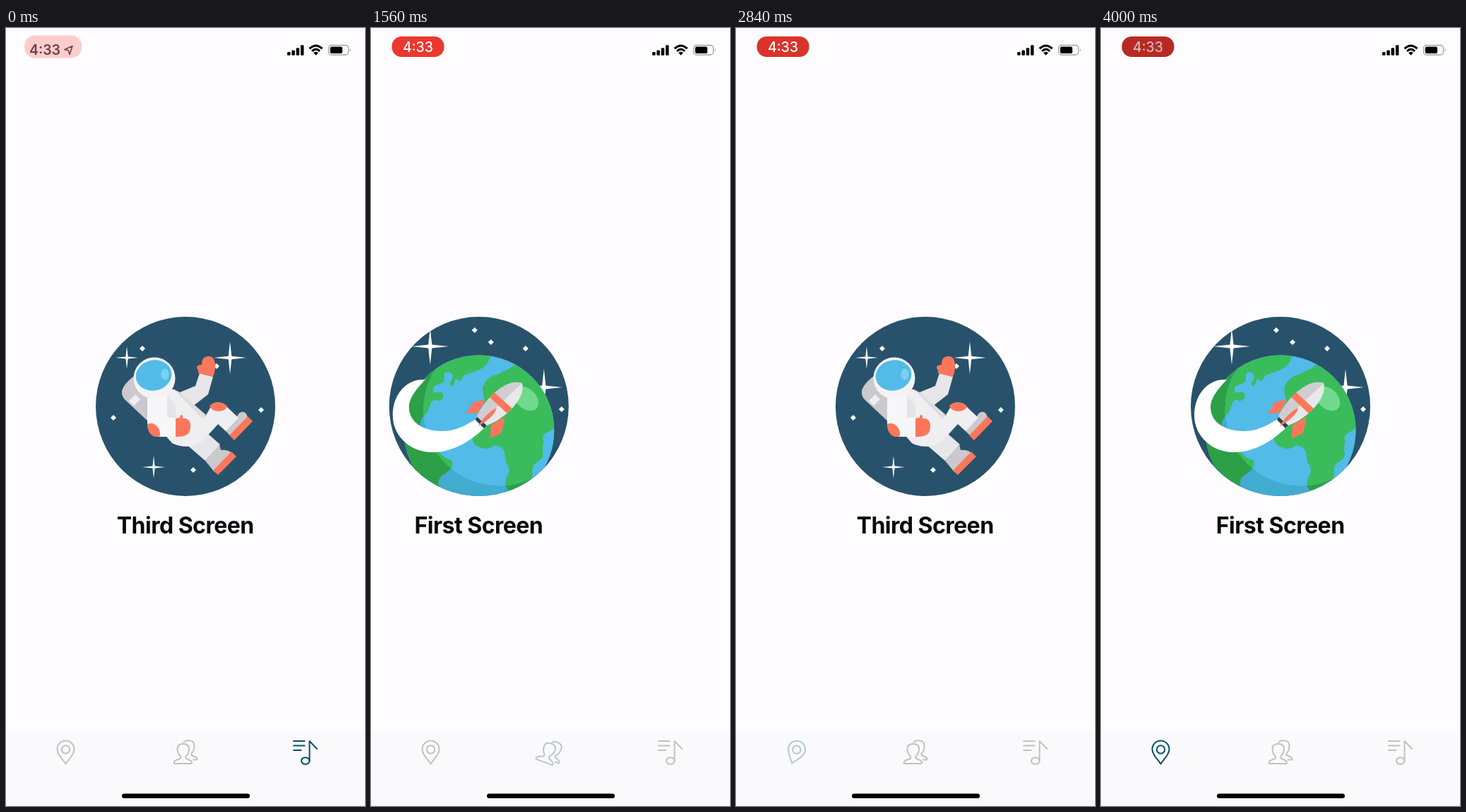
Write an HTML page that moves like this. It is 508 by 1102 pixels and loops after 4040 ms.

```html
<!DOCTYPE html>
<html lang="en">
<head>
<meta charset="utf-8">
<title>Tab bar transitions</title>
<style>
html, body { margin: 0; width: 100%; height: 100%; overflow: hidden; background: #fefcff; }
svg { display: block; width: 100%; height: 100%; }
text { font-family: Inter, Roboto, sans-serif; }
.title { font-size: 32px; font-weight: 700; letter-spacing: -.5px; text-anchor: middle; fill: #08080a; }
.icon { fill: none; stroke-width: 2; stroke-linecap: round; stroke-linejoin: round; }
.land { fill: currentColor; }
</style>
</head>
<body>
<svg viewBox="0 0 508 1102" preserveAspectRatio="none">
  <defs>
    <clipPath id="disc"><circle cx="254" cy="536" r="127"/></clipPath>
    <clipPath id="globe"><circle cx="254" cy="570" r="106.5"/></clipPath>
    <clipPath id="lit"><circle cx="283" cy="541" r="107.5"/></clipPath>
    <path id="head" d="M185 497C185 461 217 440 255.500 440C294 440 326 461 326 497C326 514 321 520 320 531C320 550 318 559 313 566L282 606C272 620 264 623 255.500 623C247 623 239 620 230 606L198 566C193 559 191 550 191 531C190 520 185 514 185 497Z"/>
    <clipPath id="face"><use href="#head"/></clipPath>
    <g id="land" class="land">
      <path d="M271 463C268 474 263 481 252 485C244 489 236 489 232 493C229 497 230 500 226 500C221 495 220 496 219 504C213 510 210 505 216 497C219 490 213 486 207 488C202 491 208 498 203 502C197 506 189 504 189 513C190 520 199 513 203 518C205 526 199 530 193 527C187 525 185 534 182 542C179 549 173 550 171 560C168 570 160 575 148 578L140 500L200 450Z"/>
      <path d="M140 580L170 594C188 599 197 597 203 606C208 612 219 610 216 617C218 624 209 629 203 633C197 637 195 645 198 650L190 662L140 640Z"/>
      <path d="M306 474C302 483 289 485 280 491C270 492 261 501 259 511L262 530L246 570C242 582 246 592 256 594C266 598 269 595 276 591C284 592 291 596 291 607C290 615 298 621 297 629C293 637 289 643 293 651L299 662L312 656C314 649 323 646 329 639C331 634 328 627 331 620C337 612 345 612 345 602C342 593 347 589 345 583C342 575 352 573 361 567L378 520L330 462Z"/>
    </g>
    <g id="brow"><path d="M184 527C184 521 190 518 194 515C217 506 240 513 245 530C247 537 243 539 239 540C226 525 208 530 187 530Z"/></g>
    <g id="eye">
      <path fill="#62d37d" d="M192 530C190 555 203 567 220 566.500C231 566 238 561 241 555Z"/>
      <path fill="#e7e6e4" d="M194 530C193 549 204 558 223 558C232 558 240 556 244 553C240 536 222 526 194 530Z"/>
    </g>
    <g id="iris">
      <ellipse cx="219" cy="543" rx="18.500" ry="16" fill="#4d4a4f"/>
      <path fill="#3a373b" d="M212 528C196 532 197 555 213 558C207 549 206 537 212 528Z"/>
      <circle cx="227" cy="538.500" r="5" fill="#8b888d"/>
    </g>
  </defs>

  <rect width="508" height="1102" fill="#fefcff"/>

  <g class="page">
    <g clip-path="url(#disc)">
      <rect x="120" y="400" width="270" height="270" fill="#28526b"/>
      <g class="stars" data-big="185 451 26,346 509 26" data-small="248 428,271 445,320 454,371 540"></g>
      <g clip-path="url(#globe)">
        <g color="#2c9f47"><rect x="140" y="460" width="230" height="220" fill="#42abd0"/><use href="#land"/></g>
        <g color="#3abc5b" clip-path="url(#lit)"><rect x="140" y="460" width="230" height="220" fill="#52bbe7"/><use href="#land"/></g>
      </g>
      <ellipse cx="321" cy="525" rx="14" ry="20" transform="rotate(-45 321 525)" fill="#70d98c"/>
      <path fill="#fff" d="M178 498C151 496 132 520 132 548C132 580 159 601 188 601C220 601 246 582 263 565L250 554C236 562 222 571 203 571C178 571 155 561 155 536C156 522 167 510 178 498Z"/>
      <path fill="#28425a" d="M253 549L266 561L261 567L249 555Z"/>
      <path fill="#fb775c" d="M263 526L246 530L236 546L253 545ZM291 551L286 574L270 581L271 562Z"/>
      <path fill="#e8e7e9" d="M315 503C320 519 303 539 291 548C281 556 273 560 265 563L251 550C255 542 260 535 266 527C277 514 298 497 315 503Z"/>
      <path fill="#cfcdd1" d="M315 503C298 497 277 514 266 527C260 535 255 542 251 550L258 557Z"/>
      <path fill="#fb775c" d="M276 516L301 539L294 546L269 523ZM279 538C278 546 267 556 253 564C259 553 269 543 279 538Z"/>
    </g>
    <text class="title" x="253.700" y="716">First Screen</text>
  </g>

  <g class="page">
    <g clip-path="url(#disc)">
      <rect x="120" y="400" width="270" height="270" fill="#28526b"/>
      <g transform="translate(-1.500 0)">
        <g class="stars" data-big="351 536 26,173 583 26" data-small="293 432,340 480,167 479,150.500 499,348 585,310 597"></g>
        <path fill="#38bd5a" d="M184 650C192 620 212 608 234 604H278C302 608 320 622 328 650V668H184Z"/>
        <path fill="#2ea94d" d="M184 650C192 620 212 608 234 604L240 611C221 620 210 640 207 668H184ZM221 607C225 631 242 641 256 641C272 641 286 628 291 607Z"/>
        <use href="#head" fill="#38bd5a"/>
        <path clip-path="url(#face)" fill="#2ea94d" d="M239 438C205 457 202 498 215 525L212 556L247 615C248 620 251 622 256 624H225L180 560V440Z"/>
        <use href="#eye"/><use href="#eye" transform="matrix(-1 0 0 1 511 0)"/>
        <use href="#iris"/><use href="#iris" x="72"/>
        <g fill="#2ea94d"><use href="#brow"/><use href="#brow" transform="matrix(-1 0 0 1 511 0)"/></g>
        <ellipse cx="299.500" cy="478" rx="11" ry="15.500" transform="rotate(-32 299.500 478)" fill="#62d37d"/>
        <g fill="#279343"><ellipse cx="248.500" cy="579" rx="4" ry="5.500"/><ellipse cx="262.500" cy="579" rx="4" ry="5.500"/></g>
        <path fill="none" stroke="#279343" stroke-width="3.500" stroke-linecap="round" d="M241 605C248 601 263 601 270 605M249 610.500H262"/>
      </g>
    </g>
    <text class="title" x="253.700" y="716">Second Screen</text>
  </g>

  <g class="page">
    <g clip-path="url(#disc)">
      <rect x="120" y="400" width="270" height="270" fill="#28526b"/>
      <g class="stars" data-big="171 467 16,317 467 23,209 622 16" data-small="193 454,298 479,152 552,361 541,265 626"></g>
      <path fill="#cbc9cd" d="M187 489C176 496 164 507 164 516C164 523 168 526 172 530L203 559L216 520Z"/>
      <path fill="#efeef1" d="M174 528L183 519L190 526L181 535Z"/>
      <path fill="#e7e6e9" d="M246 516L268 507L274 489L293 494L286 519L264 536Z"/>
      <path fill="#fb775c" d="M272 489L293 494C298 483 298 465 287 465C279 465 277 470 277 477C269 477 269 481 272 485Z"/>
      <path fill="#e7e6e9" d="M253 588L277 567L303 590L282 613Z"/>
      <path fill="#cbc9cd" d="M282 613L302 590L304 598C311 597 319 599 319 604L295 629Z"/>
      <path fill="#fb775c" d="M319 600L326 607L300 633L293 627Z"/>
      <path fill="#cbc9cd" d="M309 569L327 551C330 541 341 541 342 553L320 580Z"/>
      <path fill="#fb775c" d="M342 550L349 557L323 584L316 577Z"/>
      <path fill="#efeef1" d="M205 508L238 512L282 550L289 538C294 528 309 529 314 538L329 552L311 571L300 561L281 582C270 594 250 596 235 588L202 550Z"/>
      <path fill="#dfdde1" d="M238 512L246 516L283 548L278 554Z"/>
      <path fill="#e5e4e7" d="M228 520L240 533V552L228 556Z"/>
      <path fill="#fb775c" d="M288 536C293 528 308 528 313 537C308 545 293 545 288 536Z"/>
      <path fill="#f7f7f9" d="M200 516H228V552H241V579H216C205 578 200 570 200 560Z"/>
      <path fill="#fb775c" d="M200 561C210 557 219 566 218 578C208 582 200 574 200 561ZM240 553L246 552C246 547 251 546 250 553C258 552 262 558 261 566C260 577 253 579 240 579Z"/>
      <circle cx="210" cy="496" r="29.500" fill="#f3f2f5"/>
      <ellipse cx="209" cy="492" rx="25.500" ry="21.500" transform="rotate(-12 209 492)" fill="#52bbe7"/>
      <ellipse cx="225" cy="490.500" rx="5.500" ry="8" fill="#7bcff0"/>
    </g>
    <text class="title" x="253.700" y="716">Third Screen</text>
  </g>

  <rect y="996" width="508" height="106" fill="#faf9fc"/>
  <g class="icon">
    <path d="M84.500 1042.500C80 1035 72.500 1030 72.500 1021.500A12 12 0 0 1 96.500 1021.500C96.500 1030 89 1035 84.500 1042.500Z"/>
    <circle cx="84.500" cy="1022" r="5.700"/>
  </g>
  <g class="icon">
    <path d="M239 1042H261.500C264 1042 263.500 1038.500 260 1037L254.500 1034.500V1031.500C257.500 1029 259 1025 259 1021C259 1016.500 256 1014 250.700 1014C245.500 1014 242.500 1016.500 242.500 1021C242.500 1025 244 1029 247 1031.500V1034.500L241 1037C237.500 1038.500 236.500 1042 239 1042Z"/>
    <path d="M251.500 1011.500C254 1009.300 257 1009 259 1009.300C264 1009.500 266.500 1012.500 266.500 1017C266.500 1021.500 265 1025 262.500 1027.500V1030L268 1032.500C271 1034 271.500 1036.500 269.500 1036.500H265"/>
  </g>
  <g class="icon">
    <path d="M407 1010H422.500M407 1016.500H422.500M407 1023H417.500M429.500 1038V1010L440 1021"/>
    <ellipse cx="423.700" cy="1038" rx="5.800" ry="4.800"/>
  </g>
  <rect x="164" y="1084.500" width="181" height="6.500" rx="3.250"/>

  <rect id="pill"/>
  <g id="plain" fill="#6b4244">
    <text x="33" y="38" font-size="19.500" font-weight="600">4:33</text>
    <path d="M94 25.500L83 30.500L88.500 32L90 37.500Z" fill="none" stroke="#6b4244" stroke-width="1.600" stroke-linejoin="round"/>
  </g>
  <text id="clock" x="66.500" y="33.500" text-anchor="middle" font-size="19.500" font-weight="500">4:33</text>

  <rect x="398" y="34" width="4.500" height="4.700" rx="1.200"/>
  <rect x="404.300" y="31.500" width="4.500" height="7.200" rx="1.200"/>
  <rect x="410.600" y="28.300" width="4.500" height="10.400" rx="1.200"/>
  <rect x="416.900" y="24.300" width="4.500" height="14.400" rx="1.200"/>
  <path fill="none" stroke="#000" stroke-width="3" d="M429.500 29.200Q438.500 20.800 447.500 29.200M433 32.800Q438.500 27.600 444 32.800"/>
  <path d="M435.200 35.200Q438.500 32.400 441.800 35.200L438.500 38.700Z"/>
  <rect x="456.500" y="24.500" width="28" height="13.500" rx="4" fill="none" stroke="#a09fa3" stroke-width="1.300"/>
  <rect x="458.700" y="26.600" width="17.300" height="9.300" rx="2"/>
  <path d="M486.500 29Q489 31.200 486.500 33.500Z" fill="#a09fa3"/>
</svg>
<script>
const LOOP = 4040, WIDTH = 508, SPIN = 650;
const BAR = [250, 249, 252], GREY = [193, 193, 196], TEAL = [7, 80, 106];
const moves = [
  { tap: 420, start: 455, dur: 375, from: 2, to: 1, still: true },
  { tap: 916, start: 1137, dur: 308, from: 1, to: 0 },
  { tap: 1452, start: 1445, dur: 375, from: 0, to: 1 },
  { tap: 2006, start: 2059, dur: 375, from: 1, to: 2 },
  { tap: 2736, start: 2797, dur: 375, from: 2, to: 0 }
];
const pages = [...document.querySelectorAll('.page')];
const icons = [...document.querySelectorAll('.icon')];
const [pill, plain, clock] = ['pill', 'plain', 'clock'].map(id => document.getElementById(id));

const clamp = (v, lo = 0, hi = 1) => Math.min(hi, Math.max(lo, v));
const lerp = (a, b, k) => a + (b - a) * k;
const mix = (a, b, k) => `rgb(${a.map((v, i) => Math.round(lerp(v, b[i], k)))})`;

// cubic-bezier(.42, 0, .58, 1)
function ease(x) {
  if (x <= 0) return 0;
  if (x >= 1) return 1;
  let lo = 0, hi = 1, s;
  for (let i = 0; i < 22; i++) {
    s = (lo + hi) / 2;
    const bx = 3 * (1 - s) * s * (.42 * (1 - s) + .58 * s) + s ** 3;
    if (bx < x) lo = s; else hi = s;
  }
  return s * s * (3 - 2 * s);
}

function sparkle(x, y, r, waist) {
  let d = '';
  for (let i = 0; i < 8; i++) {
    const a = i * Math.PI / 4, q = i % 2 ? waist : r;
    d += `${i ? 'L' : 'M'}${x + q * Math.cos(a)} ${y + q * Math.sin(a)}`;
  }
  return `<path fill="#fff" d="${d}Z"/>`;
}

for (const g of document.querySelectorAll('.stars')) {
  const draw = (list, fn) => list.split(',').map(p => fn(...p.split(' ').map(Number))).join('');
  g.innerHTML = draw(g.dataset.big, (x, y, r) => sparkle(x, y, r, r * .14)) +
    draw(g.dataset.small, (x, y) => sparkle(x, y, 4, 2.83));
}

function drawPages(t) {
  const move = moves.filter(m => m.start <= t).pop();
  const x = [null, null, null];
  if (!move) x[2] = 0;
  else {
    const side = Math.sign(move.from - move.to), p = ease((t - move.start) / move.dur);
    if (p < 1) x[move.from] = side * p * WIDTH;
    x[move.to] = side * (p - 1) * WIDTH;
  }
  pages.forEach((page, i) => {
    page.style.display = x[i] === null ? 'none' : '';
    page.setAttribute('transform', `translate(${x[i] || 0} 0)`);
  });
}

function drawIcons(t) {
  const last = moves.filter(m => m.tap <= t).pop() || { to: 2, tap: -SPIN };
  icons.forEach((icon, i) => {
    const spin = moves.find(m => m.to === i && !m.still && t >= m.tap && t < m.tap + SPIN);
    const angle = spin ? 360 * ease((t - spin.tap) / SPIN) : 0;
    const tint = clamp((t - last.tap) / (SPIN * .58));
    icon.setAttribute('transform', `rotate(${angle} ${84.5 + 169.3 * i} 1026)`);
    icon.setAttribute('stroke', last.to === i ? mix(BAR, TEAL, tint) : mix(GREY, GREY, 0));
  });
}

function drawStatus(t) {
  const k = ease(t / 320), pressed = t >= 4000;
  const glow = pressed ? .72 : clamp(.925 + .11 * Math.cos((t - 2020) / 1900 * 2 * Math.PI), .86, 1);
  const box = { x: lerp(26, 29.5, k), y: lerp(10.5, 12, k), width: lerp(81, 74, k), height: lerp(32, 29, k), rx: lerp(15, 14, k) };
  for (const name in box) pill.setAttribute(name, box[name]);
  pill.setAttribute('fill', mix([255, 204, 204], [254 * glow, 59 * glow, 49 * glow], k));
  plain.setAttribute('opacity', 1 - k);
  clock.setAttribute('opacity', k);
  clock.setAttribute('fill', pressed ? '#cfb9b8' : '#fff');
}

function render(t) {
  drawPages(t);
  drawIcons(t);
  drawStatus(t);
}

const origin = performance.now();
function tick() {
  render((performance.now() - origin) % LOOP);
  requestAnimationFrame(tick);
}
render(0);
requestAnimationFrame(tick);
</script>
</body>
</html>
```
